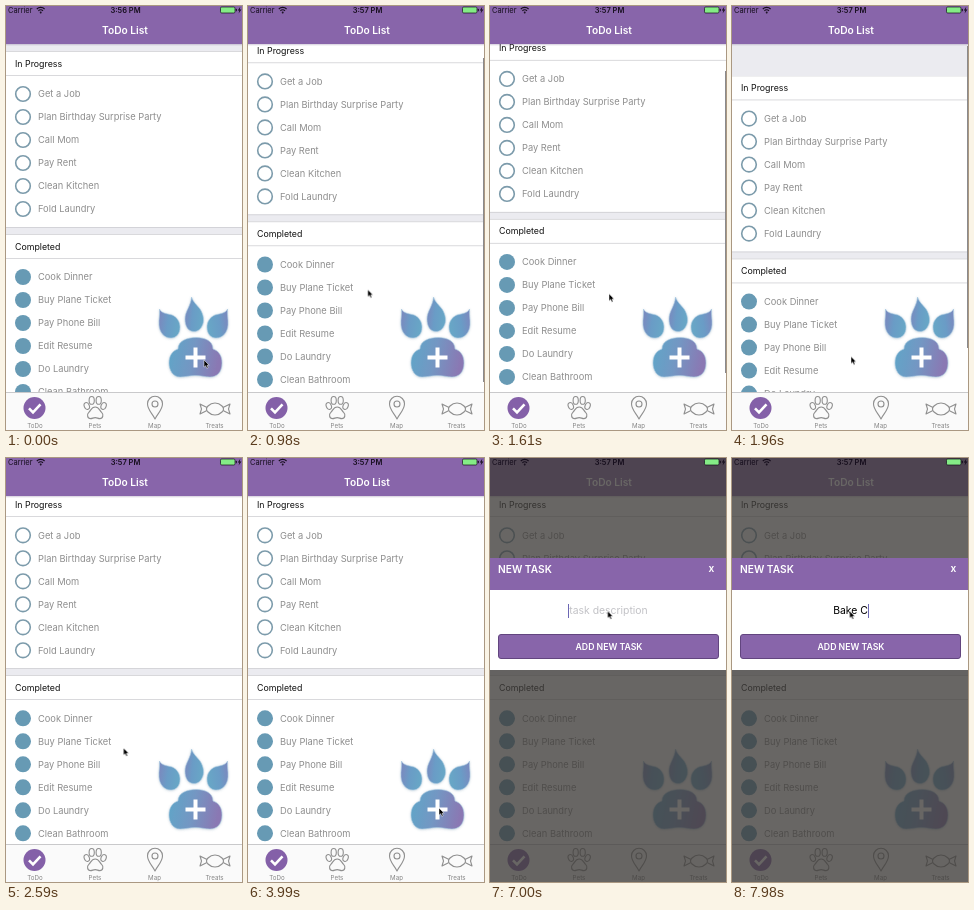
An HTML page that plays this animation: 236 by 424 pixels, repeating every 8 s.

```html
<!DOCTYPE html>
<html lang="en">
<head>
<meta charset="utf-8">
<title>ToDo List</title>
<style>
  html, body { margin: 0; width: 100%; height: 100%; overflow: hidden; }
  body { position: relative; background: #ebebf0; font-family: Inter, Roboto, sans-serif; }
  svg { position: absolute; left: 0; top: 0; width: 236px; height: 424px; overflow: hidden; }
  .anim { animation: 8s ease-in-out infinite; }
  .step { animation: 8s step-end infinite; }

  .row { font-size: 9.3px; fill: #8e8e8e; }
  .head { font-size: 8.8px; fill: #111; }
  .title { font-size: 10.2px; font-weight: 600; fill: #fff; }
  .small { font-size: 8.7px; }
  .tab { font-size: 6.2px; fill: #858585; text-anchor: middle; }
  .status { font-size: 7.5px; fill: #150d1c; }
  .clock { font-weight: 600; text-anchor: middle; }
  .icon { fill: none; stroke: #8f8f8f; stroke-width: 1.1; stroke-linejoin: round; }
  .mid { text-anchor: middle; }

  #list { animation-name: scroll; }
  @keyframes scroll {
    0%, 9.625% { transform: translateY(0); }
    16.625% { transform: translateY(-42.4px); }
    24.5% { transform: translateY(24.6px); }
    29.75%, 100% { transform: translateY(-10.7px); }
  }

  #bar { position: absolute; right: 0; width: 1.2px; background: #8a8a8d; animation-name: bar; }
  @keyframes bar {
    0%, 9.6% { top: 40px; height: 333px; opacity: 0; }
    9.7% { top: 40px; height: 333px; opacity: 1; }
    16.625% { top: 83px; height: 301px; }
    24.5% { top: 40px; height: 302px; }
    29.75% { top: 51px; height: 333px; opacity: 1; }
    32%, 100% { top: 51px; height: 333px; opacity: 0; }
  }

  #modal { position: absolute; inset: 0; animation-name: pop; }
  @keyframes pop { 0%, 51.25% { opacity: 0; } 52.5%, 100% { opacity: 1; } }

  #old { animation-name: before; }
  #new { animation-name: after; }
  @keyframes before { 0% { opacity: 1; } 3.5%, 100% { opacity: 0; } }
  @keyframes after { 0% { opacity: 0; } 3.5%, 100% { opacity: 1; } }

  #entry { position: absolute; left: 8px; top: 145px; width: 221px; height: 16px; overflow: hidden; }
  #strip { animation-name: type; font-size: 10.4px; line-height: 16px; text-align: center; white-space: pre; }
  #strip div { height: 16px; }
  #strip span { position: relative; display: inline-block; height: 16px; }
  #strip i { position: absolute; left: 100%; top: 1px; width: 1px; height: 14px; background: #6c67b4; }
  #strip .hint { color: #c2c2c6; }
  #strip .hint i { left: -1px; animation-name: blink; }
  @keyframes type {
    0% { transform: translateY(0); }
    89.2% { transform: translateY(-16px); }
    91.8% { transform: translateY(-32px); }
    94.4% { transform: translateY(-48px); }
    97.9% { transform: translateY(-64px); }
    98.8% { transform: translateY(-80px); }
    99.65%, 100% { transform: translateY(-96px); }
  }
  @keyframes blink {
    0% { opacity: 0; }
    74.3% { opacity: 1; }
    78.7% { opacity: 0; }
    82.2%, 100% { opacity: 1; }
  }

  #cursor { animation-name: move; }
  @keyframes move {
    0%, .8% { transform: translate(198px, 354px); }
    7%, 9.625% { transform: translate(120px, 300px); }
    16.625% { transform: translate(119px, 244.5px); }
    24.5% { transform: translate(119px, 350.5px); }
    29.75%, 33.25% { transform: translate(117.5px, 290px); }
    46.25%, 53.4% { transform: translate(191px, 350px); }
    59.5% { transform: translate(141px, 167px); }
    63%, 65.5% { transform: translate(122px, 157px); }
    68.25%, 70.5% { transform: translate(118px, 154px); }
    70.8%, 100% { transform: translate(117.6px, 153px); }
  }
</style>
</head>
<body>
<svg viewBox="0 0 236 424">
  <defs>
    <linearGradient id="pad" x1="0" y1="0" x2="1" y2=".15">
      <stop offset="0" stop-color="#5fa6c8"/><stop offset=".5" stop-color="#7397c3"/><stop offset="1" stop-color="#8a78b3"/>
    </linearGradient>
    <linearGradient id="toe" x1="0" y1="0" x2="1" y2=".2">
      <stop offset="0" stop-color="#7d86bd"/><stop offset=".5" stop-color="#6a9cc6"/><stop offset="1" stop-color="#68a6c6"/>
    </linearGradient>
    <linearGradient id="shade" x1="0" y1="0" x2="0" y2="1">
      <stop offset="0" stop-color="#6b5585" stop-opacity=".3"/><stop offset="1" stop-color="#6b5585" stop-opacity="0"/>
    </linearGradient>
    <filter id="lift" x="-20%" y="-20%" width="140%" height="140%">
      <feDropShadow dx="0" dy=".5" stdDeviation="1" flood-color="#5c7c98" flood-opacity=".35"/>
    </filter>
  </defs>

  <rect width="236" height="424" fill="#ebebf0"/>
  <g id="list" class="anim"></g>

  <rect width="236" height="38" fill="#8865aa"/>
  <rect y="38" width="236" height="2" fill="url(#shade)"/>
  <text class="title mid" x="119" y="28">ToDo List</text>

  <rect y="386" width="236" height="38" fill="#fafafa"/>
  <rect y="386" width="236" height=".7" fill="#b5b5b8"/>
  <circle cx="28.5" cy="402" r="11" fill="#8460a8"/>
  <path d="M23 402.3l4 4 7.5-8" fill="none" stroke="#fff" stroke-width="2.6"/>
  <g class="icon">
    <ellipse cx="80.8" cy="400" rx="2.5" ry="3.6" transform="rotate(-22 80.8 400)"/>
    <ellipse cx="85.7" cy="394.4" rx="2.6" ry="3.9"/>
    <ellipse cx="92.7" cy="394.4" rx="2.6" ry="3.9"/>
    <ellipse cx="97.6" cy="400" rx="2.5" ry="3.6" transform="rotate(22 97.6 400)"/>
    <path d="M89.2 401c4 0 4.2 3.5 6.4 5.4c2.2 2 1.5 6.2-1.8 6.2c-1.8 0-2.6-1-4.6-1s-2.8 1-4.6 1c-3.3 0-4-4.2-1.8-6.2c2.2-1.9 2.4-5.4 6.4-5.4z"/>
    <path d="M149 413c-2.2-5-7.5-9-7.5-15.2a7.5 7.5 0 0 1 15 0c0 6.2-5.3 10.2-7.5 15.2z"/>
    <circle cx="149" cy="398" r="3"/>
    <path d="M202 400c4-4 10-4 14 0c2 2 2 4 0 6c-4 4-10 4-14 0c-2-2-2-4 0-6zM201 401.5l-7-3.5 1.5 5-1.5 5 7-3.5M217 401.5l7-3.5-1.5 5 1.5 5-7-3.5"/>
  </g>
  <text class="tab" x="29" y="422">ToDo</text>
  <text class="tab" x="89" y="422">Pets</text>
  <text class="tab" x="148.5" y="422">Map</text>
  <text class="tab" x="208.5" y="422">Treats</text>

  <g filter="url(#lift)" stroke="#a9cbe2" stroke-width=".6">
    <path id="side" fill="url(#toe)" d="M153.5 303C155 307 160 307.5 166 309C171 311 174 316 174 321C174 328 170 332 165 332C158 332 153.5 326 153 319C152.6 313 154 309 153.5 303Z"/>
    <use href="#side" transform="matrix(-1 0 0 1 375 0)"/>
    <path fill="url(#toe)" d="M185.5 291C187 296 191 299 194 303C198 309 198.5 316 196 320C194 324 191 325.5 188 325.5C182 325.5 179 320 179 313C179 305 185 300 185.5 291Z"/>
    <path fill="url(#pad)" d="M172 343C172 335 181 331.5 190 331.5C199 331.5 207 335 207 343C213 345 216 350 216 357C216 366 211 371 204 371C199 371 195 369.5 189.5 369.5C184 369.5 179 371 174 371C167 371 163 364 163 357C163 350 166 345 172 343Z"/>
  </g>
  <path d="M179.5 351.5h20M189.5 341.5v20" stroke="#fff" stroke-width="4"/>
</svg>

<div id="bar" class="anim"></div>

<div id="modal" class="anim">
  <svg viewBox="0 0 236 424">
    <rect width="236" height="424" fill="#3e3c39" fill-opacity=".78"/>
    <rect y="100" width="236" height="112" fill="#fff"/>
    <rect y="100" width="236" height="32" fill="#8865aa"/>
    <text class="title" x="8" y="114.6">NEW TASK</text>
    <text class="title mid" x="221.5" y="113.6">x</text>
    <rect x="8.5" y="176.5" width="220" height="24" rx="2.5" fill="#8865aa" stroke="#62457f"/>
    <text class="title small mid" x="119" y="192">ADD NEW TASK</text>
  </svg>
  <div id="entry"><div id="strip" class="step"><div><span class="hint">task description<i class="step"></i></span></div></div></div>
</div>

<svg viewBox="0 0 236 424">
  <text class="status" x="2" y="6.7">Carrier</text>
  <g fill="none" stroke="#150d1c" stroke-width="1.1">
    <path d="M30.8 3a5.5 5.5 0 0 1 7.8 0M32.4 4.8a3.2 3.2 0 0 1 4.600 0"/>
    <circle cx="34.7" cy="6.5" r=".4"/>
  </g>
  <text id="old" class="status clock step" x="119.5" y="6.7">3:56 PM</text>
  <text id="new" class="status clock step" x="119.5" y="6.7">3:57 PM</text>
  <rect x="214.5" y="1" width="14.5" height="6" rx="1.2" fill="#84ec86" stroke="#150d1c" stroke-width=".7"/>
  <rect x="229.8" y="2.8" width="1" height="2.4" rx=".5" fill="#150d1c"/>
  <path d="M234.3 .8L231.8 4.4H233.4L232.6 7.4L235.4 3.600H233.700Z" fill="#150d1c"/>
  <path id="cursor" class="anim" d="M0 0V7.2L1.7 5.7L2.8 8.3L4.1 7.7L3 5.2H5.2Z" fill="#000" stroke="#fff" stroke-width=".5"/>
</svg>

<script>
  const ROW = 23;
  const groups = [
    { y: 45, done: false, name: "In Progress", tasks: ["Get a Job", "Plan Birthday Surprise Party", "Call Mom", "Pay Rent", "Clean Kitchen", "Fold Laundry"] },
    { y: 228, done: true, name: "Completed", tasks: ["Cook Dinner", "Buy Plane Ticket", "Pay Phone Bill", "Edit Resume", "Do Laundry", "Clean Bathroom"] }
  ];
  const line = y => `<rect y="${y}" width="236" height=".7" fill="#c9c9cd"/>`;

  function task(text, y, done) {
    const paint = done ? 'r="8" fill="#679ab4"' : 'r="7.3" fill="#fff" stroke="#7c9bab" stroke-width="1.6"';
    return `<circle cx="17" cy="${y}" ${paint}/><text class="row" x="32" y="${y + 3.3}">${text}</text>`;
  }

  function group({ y, done, name, tasks }) {
    return `<rect y="${y}" width="236" height="176" fill="#fff"/>` +
      line(y) + line(y + 24) + line(y + 176) +
      `<text class="head" x="9" y="${y + 15.5}">${name}</text>` +
      tasks.map((text, i) => task(text, y + 43 + i * ROW, done)).join("");
  }

  document.getElementById("list").innerHTML = groups.map(group).join("");

  const typed = "Bake C";
  const strip = document.getElementById("strip");
  for (let n = 1; n <= typed.length; n++) {
    strip.insertAdjacentHTML("beforeend", `<div><span>${typed.slice(0, n)}<i></i></span></div>`);
  }
</script>
</body>
</html>
```
